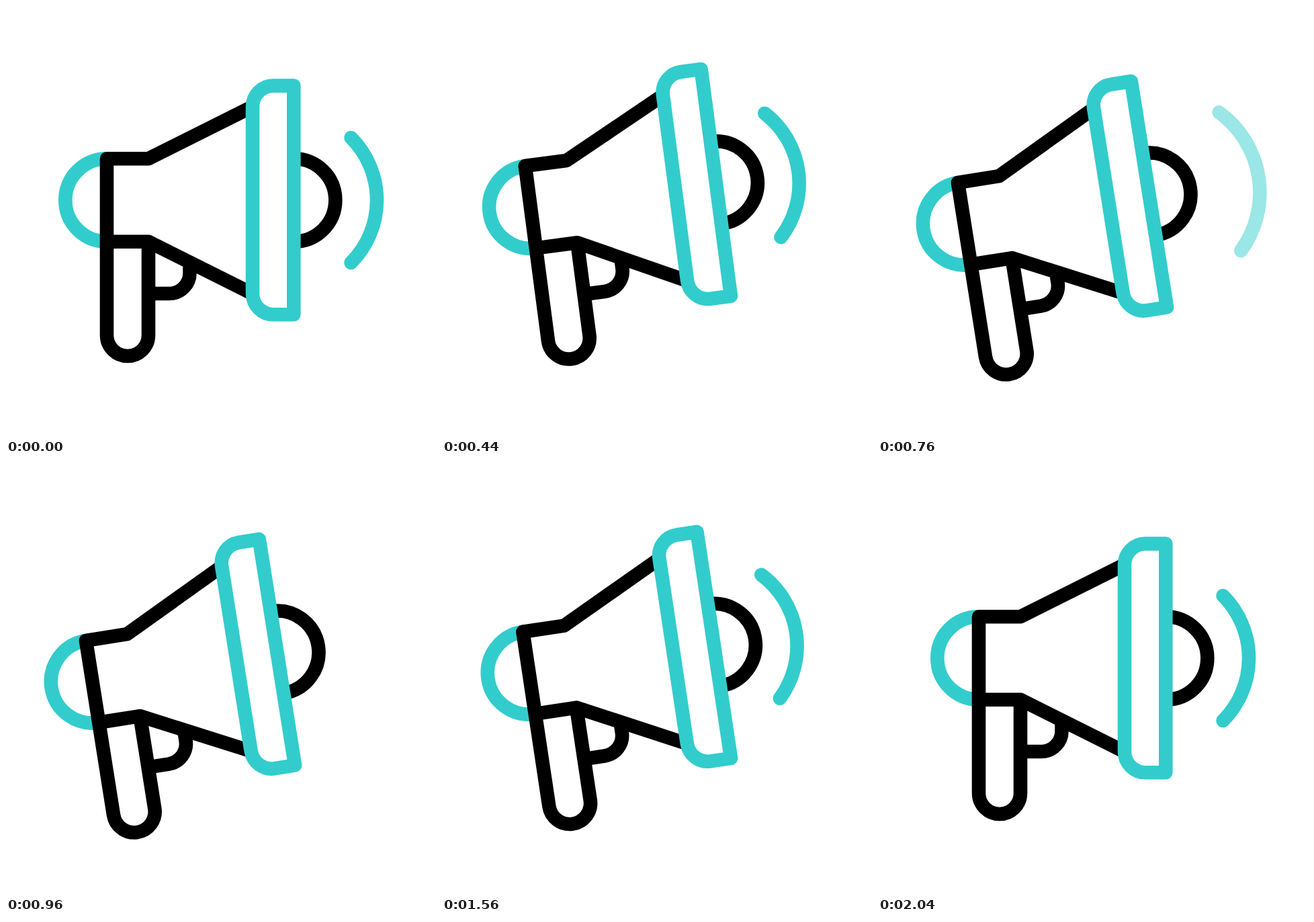
An HTML page for the animation above (2.16 s loop, 640x640 px).

```html
<!DOCTYPE html>
<html lang="en">
<head>
<meta charset="utf-8">
<title>Megaphone</title>
<style>
  html, body { margin: 0; width: 100%; height: 100%; overflow: hidden; background: #fff; }
  svg { display: block; width: 100vw; height: 100vh; }
  path { fill: none; stroke: #000; stroke-width: 20.6; stroke-linejoin: round; }
  .teal { stroke: #33cccc; }
  #wave { stroke-linecap: round; }
</style>
</head>
<body>
<svg viewBox="0 0 640 640">
  <g id="megaphone">
    <path class="teal" d="M150 227.3A61.7 61.7 0 0 0 150 350.7"/>
    <path d="M212 428H243A30.5 30.5 0 0 0 273.5 397.5V381"/>
    <path d="M366 150.3L212 227.3H150V490A31 31 0 0 0 212 490V350.7"/>
    <path d="M150 350.7H212L366 427.7"/>
    <path id="mouth"/>
    <path class="teal" d="M428.3 118.6H398A31 31 0 0 0 367 149.6V428.2A31 31 0 0 0 398 459.2H428.3Z"/>
    <path id="wave" class="teal"/>
  </g>
</svg>
<script>
  const LOOP = 2160, STEP = 40, AXIS_Y = 289;
  const [megaphone, mouth, wave] =
    ["megaphone", "mouth", "wave"].map(id => document.getElementById(id));

  // Eased progress from 0 to 1 between two times
  function ease(t, start, end) {
    const u = Math.min(1, Math.max(0, (t - start) / (end - start)));
    return u * u * (3 - 2 * u);
  }

  // Rises to 1 at the peak and falls back to 0
  const pulse = (t, start, peak, end) => ease(t, start, peak) - ease(t, peak, end);

  const arc = (x, half, r) =>
    `M${x} ${AXIS_Y - half}A${r} ${r} 0 0 1 ${x} ${AXIS_Y + half}`;

  function waveState(t) {
    if (t < 970) {
      const out = ease(t, 430, 960);
      return { shift: 54 * out, scale: 1 + 0.178 * out, opacity: 1 - ease(t, 555, 960) };
    }
    const grow = ease(t, 970, 1500);
    return { shift: -15 * (1 - grow), scale: 0.55 + 0.45 * grow, opacity: grow };
  }

  function draw(t) {
    const tilt = 9 * (ease(t, 40, 582) - ease(t, 1485, 2030));
    const lift = 19.5 * pulse(t, 40, 505, 750) + 13.2 * pulse(t, 1320, 1640, 2030);
    megaphone.setAttribute("transform", `translate(0 ${-lift}) rotate(${-tilt} 360.6 442.5)`);

    const radius = 61.7 + 11 * pulse(t, 960, 1240, 1520);
    mouth.setAttribute("d", arc(428.6, radius, radius));

    const { shift, scale, opacity } = waveState(t);
    wave.setAttribute("d", arc(513.5 + shift, 93 * scale, 131.6 * scale));
    wave.setAttribute("opacity", opacity);
  }

  const begin = performance.now();
  function tick() {
    const t = (performance.now() - begin) % LOOP;
    draw(Math.floor(t / STEP) * STEP);
    requestAnimationFrame(tick);
  }
  tick();
</script>
</body>
</html>
```
